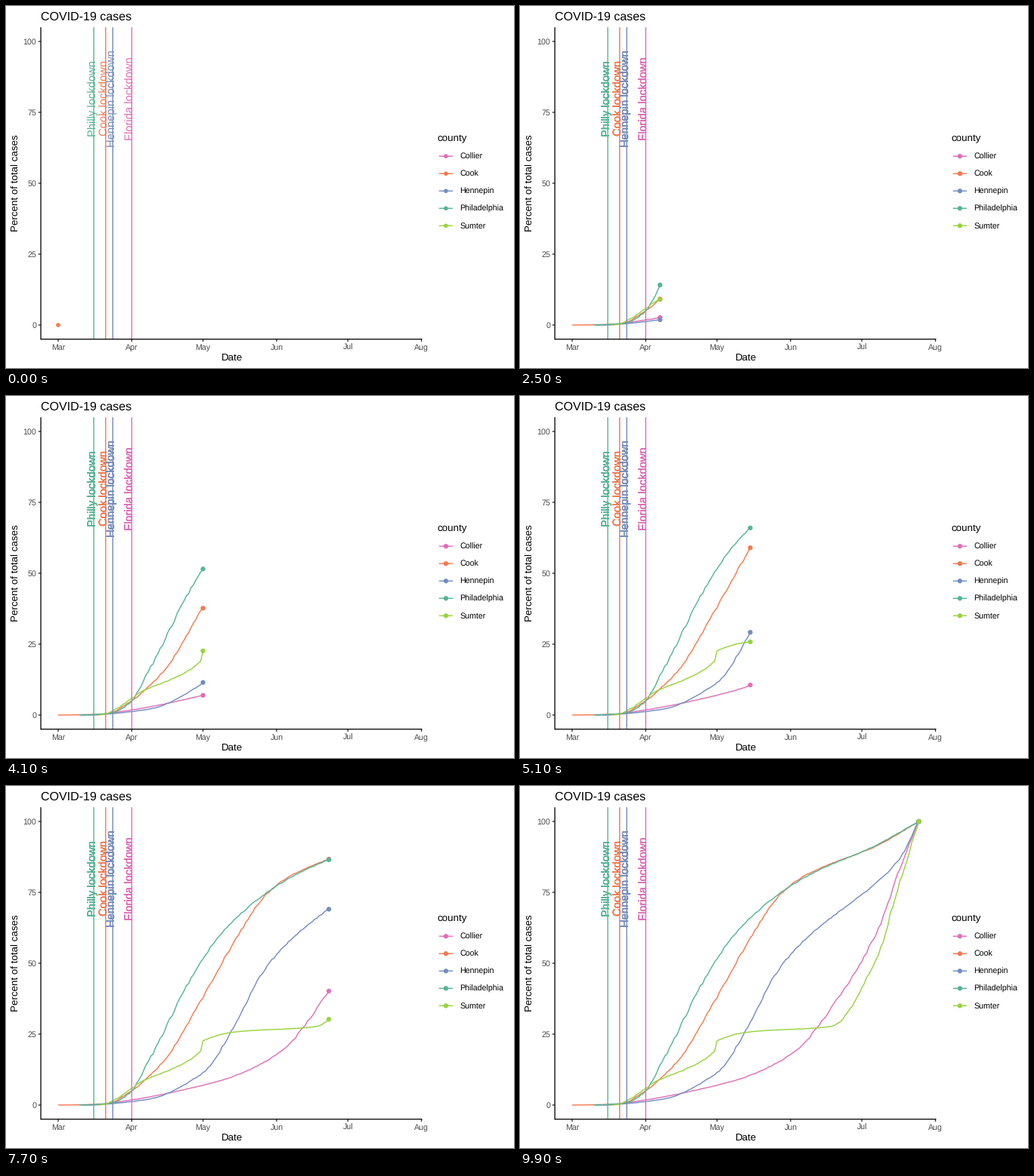
Recreate the animation shown at these times as a matplotlib script. Size 672x480 px, loop 10 s.

```python
import matplotlib.pyplot as plt
import numpy as np
from matplotlib.animation import FuncAnimation
from matplotlib.patches import Circle

W, H, DPI = 672, 480, 96
FRAMES, DAYS = 100, 146
PX = 72 / DPI  # one pixel in points

plt.rcParams.update({
    "font.family": "Liberation Sans",
    "text.hinting": "none",
    "path.simplify": False,
})

PINK, ORANGE, BLUE = "#E06EB7", "#F5794F", "#738DC0"
TEAL, GREEN = "#55B496", "#98D33E"
LEFT, RIGHT, TOP, BOTTOM = 46.07, 550.5, 28.2, 441.8
END = (DAYS, 100)

# Name, colour and the bends of each curve as (day, percent)
counties = [
    ("Collier", PINK, [(13, 0), (31, 1.8), (61, 7), (75, 10.5), (94, 19),
                       (111, 36.5), (129, 62.2), (140, 88), END]),
    ("Cook", ORANGE, [(0, 0), (20, .4), (31, 5.1), (46, 17.2), (61, 38),
                      (75, 58.8), (87, 73.7), (98, 80.9), (129, 91.7), END]),
    ("Hennepin", BLUE, [(10, 0), (37, 1.9), (61, 11.4), (75, 29.1),
                        (85, 45.4), (98, 58.3), (129, 79.1), (138, 87), END]),
    ("Philadelphia", TEAL, [(9, 0), (23, .8), (31, 5), (37, 13.7), (61, 51.7),
                            (75, 66), (98, 80.3), (129, 92), END]),
    ("Sumter", GREEN, [(17, 0), (37, 9), (47, 12.4), (60, 19), (61, 22.5),
                       (75, 25.8), (109, 27.7), (129, 53.4), (137, 76), END]),
]
lockdowns = [("Philly", 15, TEAL), ("Cook", 20, ORANGE),
             ("Hennepin", 23, BLUE), ("Florida", 31, PINK)]


def day_x(day):
    return 69 + 3.141 * day


def pct_y(pct):
    return 423 - 3.76 * pct


def rising(bends, t):
    """Monotone cubic through the bends."""
    x, y = np.array(bends, float).T
    t = np.clip(t, x[0], x[-1])
    h = np.diff(x)
    s = np.diff(y) / h
    m = np.r_[0, 2 * s[:-1] * s[1:] / (s[:-1] + s[1:]), s[-1]]
    i = np.clip(np.searchsorted(x, t, "right") - 1, 0, len(h) - 1)
    u = (t - x[i]) / h[i]
    ease = u * u * (3 - 2 * u)
    return (y[i] + (y[i + 1] - y[i]) * ease
            + h[i] * u * (1 - u) * (m[i] * (1 - u) - m[i + 1] * u))


fig = plt.figure(figsize=(W / DPI, H / DPI), dpi=DPI, facecolor="white")
ax = fig.add_axes([0, 0, 1, 1])
ax.set(xlim=(0, W), ylim=(H, 0))
ax.axis("off")


def stroke(xs, ys, color, width=1.42, z=1):
    line, = ax.plot(xs, ys, color=color, lw=width * PX, zorder=z,
                    solid_capstyle="butt", solid_joinstyle="round",
                    snap=False)
    return line


def dot(x, y, color):
    return ax.add_patch(Circle((x, y), 2.8, fc=color, lw=0, zorder=4))


def label(x, y, text, size, color="black", ha="left", angle=0):
    return ax.text(x, y, text, size=size, color=color, ha=ha, va="baseline",
                   rotation=angle, rotation_mode="anchor", zorder=3)


# Titles and axes
label(46, 19, "COVID-19 cases", 12)
label(299, 471, "Date", 10, ha="center")
label(16, 235, "Percent of total cases", 10, ha="center", angle=90)
stroke([LEFT, LEFT], [TOP, BOTTOM + .65], "black", 1.3, 5)
stroke([LEFT, RIGHT], [BOTTOM, BOTTOM], "black", 1.3, 5)

months = zip(("Mar", "Apr", "May", "Jun", "Jul", "Aug"),
             (0, 31, 61, 92, 122, 153))
for name, day in months:
    x = day_x(day)
    stroke([x, x], [BOTTOM, BOTTOM + 3.4], "#333333", 1.3)
    label(x, 456, name, 8, "#4D4D4D", "center")
for pct in range(0, 101, 25):
    y = pct_y(pct)
    stroke([LEFT - 3.4, LEFT], [y, y], "#333333", 1.3)
    label(40.2, y + 3.8, str(pct), 8, "#4D4D4D", "right")

# Legend, curves and their leading dots
rng = np.random.default_rng(19)
label(570, 179, "county", 10)
keys, curves = [], []
for i, (name, color, bends) in enumerate(counties):
    y = 199.2 + 23.04 * i
    stroke([572.7, 591.1], [y, y], color)
    keys.append(dot(581.9, y, color))
    label(600.5, y + 3.8, name, 8)
    days = np.arange(bends[0][0], DAYS + 1)
    lag = rng.uniform(-.3, .3, days.size)  # uneven daily reporting
    lag[-1] = 0
    ys = pct_y(rising(bends, days + lag))
    curves.append((days, ys, stroke([], [], color), dot(0, 0, color)))

# One copy of each lockdown label per county that has reported
for name, day, color in lockdowns:
    x = day_x(day)
    stroke([x, x], [TOP, BOTTOM], color, z=2)
layers = [[label(day_x(day - 1) + 6, pct_y(80), f"{name} lockdown",
                 11.04, color, "center", 90)
           for name, day, color in lockdowns]
          for _ in counties]


def update(frame):
    today = min(DAYS, int((frame + .5) * DAYS / (FRAMES - 1)))
    active = sum(days[0] <= today for days, *_ in curves)
    radius = 3.15 if active == len(curves) else 2.8
    for days, ys, line, head in curves:
        n = max(0, today - days[0] + 1)
        line.set_data(day_x(days[:n]), ys[:n])
        head.set_visible(n > 0)
        head.set_radius(radius)
        if n:
            head.center = day_x(today), ys[n - 1]
    for key in keys:
        key.set_radius(radius)
    for i, layer in enumerate(layers):
        for text in layer:
            text.set_visible(i < active)
    return []


anim = FuncAnimation(fig, update, frames=FRAMES, interval=100,
                     init_func=lambda: update(0), repeat=True,
                     repeat_delay=0, blit=False)
plt.show()
```
